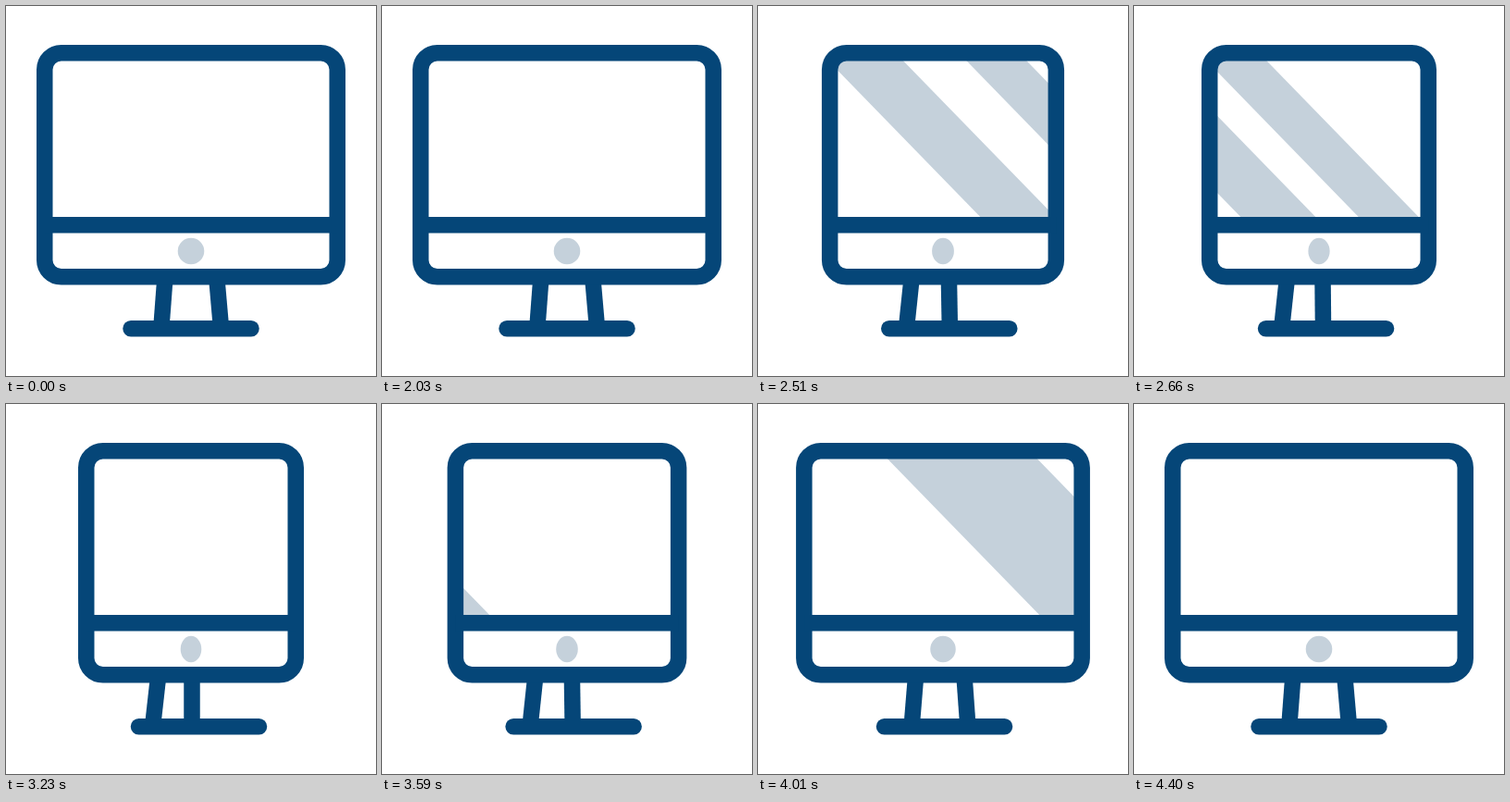
Write an HTML page without scripts that moves like this. It is 400x400 px and loops after 4.43 s.

```html
<!DOCTYPE html>
<html lang="en">
<head>
<meta charset="utf-8">
<title>Turning monitor</title>
<style>
  /* --turn: 0 facing front, 1 fully turned; --tick: steps of 30 ms since the turn began */
  @property --turn { syntax: "<number>"; inherits: true; initial-value: 0; }
  @property --tick { syntax: "<number>"; inherits: true; initial-value: 0; }

  html, body { margin: 0; width: 100%; height: 100%; overflow: hidden; background: #fff; }

  svg {
    display: block;
    width: 100%;
    height: 100%;
    animation: turn 4430ms infinite, tick 4430ms linear infinite;
  }

  @keyframes turn {
    0% { --turn: 0; }
    45.82% { --turn: 0; animation-timing-function: cubic-bezier(.13, 0, .04, 1); }
    72.91% { --turn: 1; animation-timing-function: cubic-bezier(.53, 0, .45, 1); }
    99.32%, 100% { --turn: 0; }
  }

  @keyframes tick {
    0%, 45.82% { --tick: 0; }
    99.32%, 100% { --tick: 79; }
  }

  .line { fill: none; stroke: #054678; stroke-width: 17.5px; }
  .light { fill: #c5d1db; }

  .body {
    x: calc(41.75px + 45px * var(--turn));
    width: calc(316.5px - 90px * var(--turn));
  }
  .divider {
    fill: #054678;
    x: calc(42px + 45px * var(--turn));
    width: calc(316px - 90px * var(--turn));
  }
  .button { rx: calc(14.3px - 3px * var(--turn)); }

  .foot { transform: translateX(calc(8.5px * var(--turn))); }
  .left-leg {
    transform: translate(calc(168.3px - 9px * var(--turn)), 342px)
               skewX(calc(-4.3deg - 2.1deg * var(--turn)));
  }
  .right-leg {
    transform: translate(calc(232px - 31px * var(--turn)), 342px)
               skewX(calc(5deg - 5deg * var(--turn)));
  }

  .wide { transform: translateX(calc(477px - 25px * var(--tick))); }
  .narrow { transform: translateX(calc(697px - 29.4px * var(--tick))); }
  .returning { transform: translateX(calc(-1511px + 25px * var(--tick))); }
</style>
</head>
<body>
<svg viewBox="0 0 400 400">
  <clipPath id="screen">
    <rect class="body" y="50.75" height="186" rx="18"/>
  </clipPath>

  <g class="light" clip-path="url(#screen)">
    <path class="wide" d="M-9 50h81l182 187h-81z"/>
    <path class="narrow" d="M-9 50h65l182 187h-65z"/>
    <path class="returning" d="M-9 50h162l182 187h-162z"/>
  </g>

  <g class="line">
    <path class="left-leg" d="M0 0V-46"/>
    <path class="right-leg" d="M0 0V-46"/>
    <path class="foot" d="M135 348.75H265" stroke-linecap="round"/>
    <rect class="body" y="50.75" height="242" rx="18"/>
  </g>
  <rect class="divider" y="228" height="17.5"/>
  <ellipse class="button light" cx="200" cy="265" ry="14.3"/>
</svg>
</body>
</html>
```
